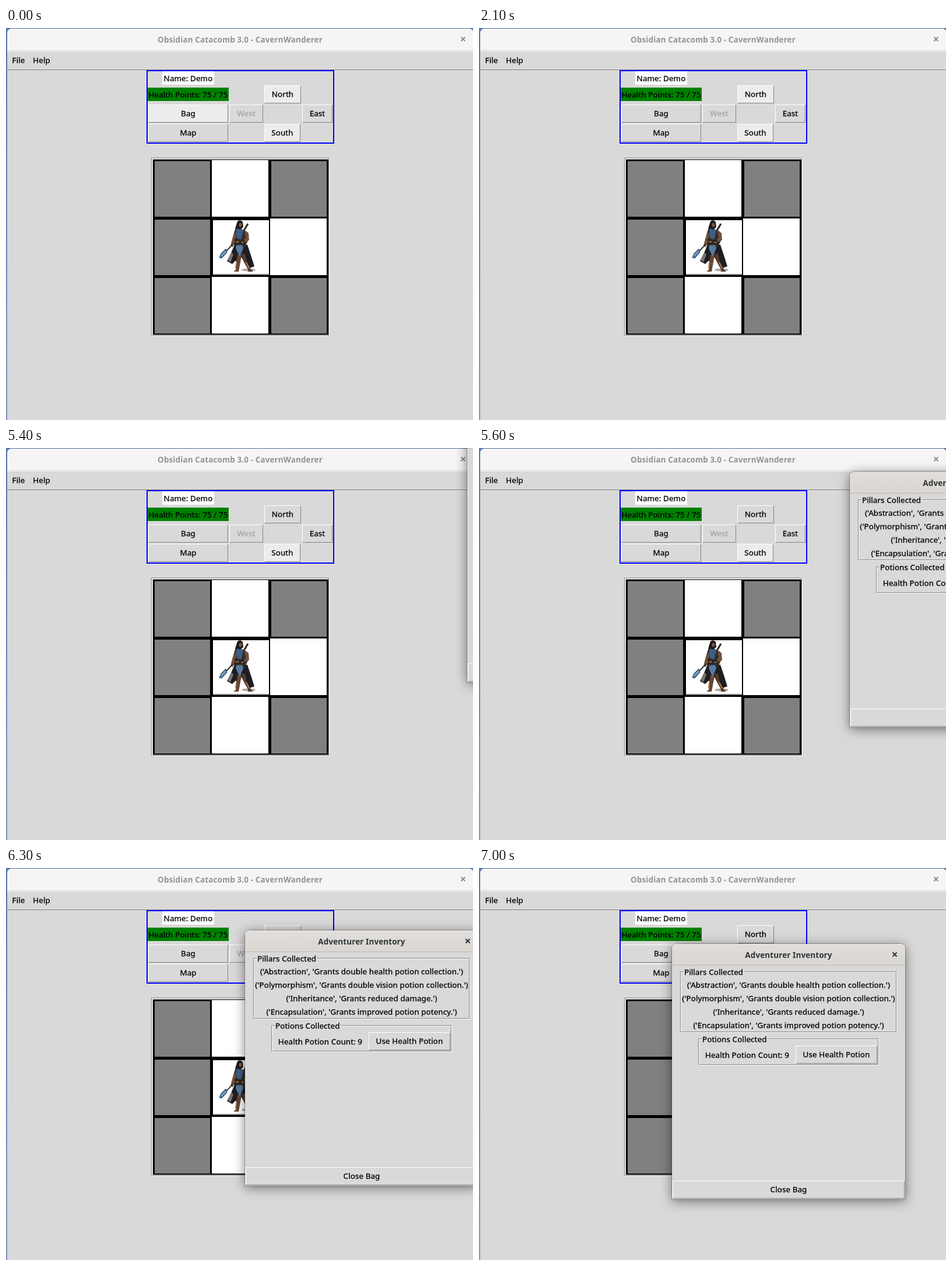
Animation, 801 px wide and 671 px high, one loop 8 s. Source, as an HTML page:

```html
<!DOCTYPE html>
<html lang="en">
<head>
<meta charset="utf-8">
<title>Dungeon game window</title>
<style>
html, body { margin: 0; width: 100%; height: 100%; overflow: hidden; }
body { position: relative; background: linear-gradient(#5a7dbb, #6f8fc8 50%, #8ba6d2);
  font: 500 13.4px "Noto Sans", "Open Sans", sans-serif; color: #000;
  letter-spacing: .1px; -webkit-text-stroke: .3px; }
div, svg { position: absolute; box-sizing: border-box; }
div { white-space: nowrap; }
.text { text-align: center; }
.title { font-weight: 700; font-size: 13.5px; -webkit-text-stroke: 0; }
.raised { border: 1px solid; border-color: #fff #828282 #828282 #fff; background: #d9d9d9; }
.groove { border: 1px solid; border-color: #828282 #fff #fff #828282; }
.groove::after { content: ""; position: absolute; inset: 0; border: 1px solid;
  border-color: #fff #828282 #828282 #fff; }
.hover { background: #ececec; }
.pressed { border-color: #828282 #fff #fff #828282; padding: 1px 0 0 1px; }
#main { left: 2px; top: 1px; width: 800px; height: 671px; background: #d9d9d9;
  border-radius: 8px 8px 0 0; box-shadow: 0 0 0 1px rgba(0,0,0,.15); overflow: hidden; }
#stage { left: 0; top: 0; width: 801px; height: 671px; overflow: hidden; }
#bag { left: 0; top: 0; width: 400px; height: 437px; background: #d9d9d9;
  border-radius: 8px 8px 0 0;
  box-shadow: 0 0 0 1px rgba(0,0,0,.25), 0 3px 20px rgba(0,0,0,.5); }
</style>
</head>
<body>
<div id="stage"><div id="main"></div></div>
<script>
const stage = document.getElementById("stage");

function box(parent, x, y, w, h, cls = "", css = "", text = "") {
  const el = document.createElement("div");
  el.className = cls;
  el.style.cssText = `left:${x}px;top:${y}px;width:${w}px;height:${h}px;${css}`;
  el.textContent = text;
  parent.append(el);
  return el;
}
// Text centred on a point
const label = (parent, cx, cy, text, css = "", cls = "") =>
  box(parent, cx - 200, cy - 10, 400, 20, "text " + cls, "line-height:20px;" + css, text);
const button = (parent, x, y, w, h, text, css = "") =>
  box(parent, x, y, w, h, "text raised", `line-height:${h - 2}px;` + css, text);
const fill = (x, y, w, h, color) => box(stage, x, y, w, h, "", "background:" + color);

function svg(parent, x, y, w, h, body) {
  parent.insertAdjacentHTML("beforeend",
    `<svg style="left:${x}px;top:${y}px" width="${w}" height="${h}">${body}</svg>`);
}
const cross = (parent, cx, cy, color) => svg(parent, cx - 5, cy - 5, 10, 10,
  `<path d="M1.5 1.5l7 7m0-7l-7 7" stroke="${color}" stroke-width="2"/>`);

function group(parent, x, y, w, h, text) {
  box(parent, x, y, w, h, "groove");
  box(parent, x + 6, y - 9, 0, 20, "", "width:auto;padding:0 1px;line-height:20px;background:#d9d9d9", text);
}

// Main window
box(document.getElementById("main"), 0, 0, 800, 38, "", "background:#f6f5f4;border-bottom:1px solid #d5d0cc");
label(stage, 401.5, 19.5, "Obsidian Catacomb 3.0 - CavernWanderer", "color:#929595", "title");
cross(stage, 784, 19, "#8b8e8f");
box(stage, 2, 39, 800, 33, "", "border:solid #fff;border-width:1px 0 0;border-bottom:1px solid #828282");
const help = box(stage, 39, 39, 43, 32);
label(stage, 21.5, 55, "File");
label(stage, 61, 55, "Help");

// Controls
box(stage, 241, 72, 322, 126, "", "border:2px solid #00f");
fill(268, 74, 89, 23, "#fff");
label(stage, 312.5, 86, "Name: Demo");
fill(243, 102, 139, 23, "#008000");
label(stage, 312.5, 114, "Health Points: 75 / 75");
const bagButton = button(stage, 244, 131, 137, 31, "Bag");
button(stage, 244, 164, 137, 31, "Map");
button(stage, 383, 131, 58, 31, "West", "color:#a3a3a3");
const north = button(stage, 443, 98, 63, 31, "North");
button(stage, 508, 131, 52, 31, "East");
button(stage, 443, 164, 62, 31, "South").classList.add("hover");

// Map view
box(stage, 249, 222, 306, 306, "groove");
fill(252, 225, 301, 300, "#000");
for (const [col, row] of [[0, 0], [2, 0], [0, 1], [0, 2], [2, 2]])
  fill(255 + col * 100, 228 + row * 100, 95, 95, "#808080");
for (const [col, row] of [[1, 0], [2, 1], [1, 2]])
  fill(253 + col * 100, 226 + row * 100, 97, 97, "#fff");
fill(355, 329, 96, 94, "#fff");
fill(355, 421, 96, 2, "#808080");

// Hero silhouette
svg(stage, 352, 325, 100, 100, `
  <ellipse cx="64" cy="89" rx="12" ry="2.5" fill="#aaa"/>
  <path d="M63 10l-9 15" stroke="#33251d" stroke-width="3"/>
  <path d="M40 46l-6 14-7 14 9 5 6-6 4 8 6-14 6 12 5 8 11-4-6-19-6-18z" fill="#1e1d22"/>
  <path d="M35 59l-7 13 5 4 5-13z" fill="#77736f"/>
  <path d="M45 63l-2 14-1 12-4 3h9l3-16 2-12z" fill="#68462f"/>
  <path d="M52 62l5 15 6 11v4h9l-4-4-7-12-3-15z" fill="#5a3c29"/>
  <path d="M43 77l-1 9m18-10l5 10" stroke="#a57c58" stroke-width="2"/>
  <path d="M41 21l-3 18 5 12h14l6-12-1-15-8-4z" fill="#332c2c"/>
  <path d="M40 22l-4 14-3 12 4 2 6-15zM57 22l7 4 1 12-10 5-2-3 6-6z" fill="#70503c"/>
  <path d="M44 18l-2 11 5 9h4l4-16-4-5z" fill="#3c5f86"/>
  <path d="M44 44l-2 8 7 15 6-15-3-8z" fill="#567ba2"/>
  <path d="M40 37l17 3m-18 5l20-1" stroke="#30261f" stroke-width="4"/>
  <path d="M43 41h4m5 1h3" stroke="#a17d5d" stroke-width="2"/>
  <path d="M45 6q5-4 9 1l1 9-6 4-4-2-5 7 2-10z" fill="#1d1918"/>
  <ellipse cx="50" cy="12" rx="2.5" ry="3.5" fill="#7d5a44"/>
  <path d="M37 45L23 60" stroke="#333" stroke-width="2"/>
  <path d="M25 53l-8 8-3 7 4 1 9-10z" fill="#50779e" stroke="#293f57"/>
  <path d="M17 65l8-8" stroke="#9ab8d4" stroke-width="1.5"/>`);

// Inventory window
const bag = box(stage, 0, 0, 400, 437);
bag.id = "bag";
box(bag, 0, 0, 400, 37, "", "border-radius:8px 8px 0 0;background:linear-gradient(#e1dedb,#dad6d2);border-bottom:1px solid #bfb8b1;box-shadow:inset 0 1px #f0eeec");
label(bag, 200, 18.5, "Adventurer Inventory", "color:#2e3436", "title");
cross(bag, 382, 18, "#2e3436");
group(bag, 14, 47, 372, 105, "Pillars Collected");
[
  "('Abstraction', 'Grants double health potion collection.')",
  "('Polymorphism', 'Grants double vision potion collection.')",
  "('Inheritance', 'Grants reduced damage.')",
  "('Encapsulation', 'Grants improved potion potency.')"
].forEach((text, i) => label(bag, 200, 70 + i * 23, text));
group(bag, 45, 162, 310, 46, "Potions Collected");
label(bag, 129, 190, "Health Potion Count: 9");
button(bag, 212, 174, 140, 31, "Use Health Potion");
button(bag, 1, 405, 398, 31, "Close Bag");

// Drag path: time, x, y
const path = [
  [0, 801, -36], [5300, 801, -36], [5400, 791, -36], [5700, 558, 79], [5900, 558, 79],
  [6000, 499, 104], [6200, 432, 106], [6400, 388, 108], [6600, 359, 111],
  [6800, 338, 119], [7000, 331, 130], [8000, 331, 130]
];

function place(t) {
  const i = path.findIndex(p => p[0] > t);
  const [a, b] = [path[i - 1], path[i]];
  const k = (t - a[0]) / (b[0] - a[0]);
  return [1, 2].map(n => Math.round(a[n] + (b[n] - a[n]) * k));
}

function draw() {
  const t = performance.now() % 8000;
  const step = Math.floor(t / 100) * 100;
  const pressed = t >= 2900 && t < 3100;
  help.className = t >= 1500 && t < 2100 ? "raised hover" : "";
  bagButton.classList.toggle("hover", t < 700 || t >= 2500 && t < 3100);
  bagButton.classList.toggle("pressed", pressed);
  north.classList.toggle("hover", t < 3200);
  const [x, y] = place(step);
  bag.style.transform = `translate(${x}px,${y}px)`;
  bag.style.opacity = Math.max(0, Math.min(1, (step - 3000) / 400));
  requestAnimationFrame(draw);
}
draw();
</script>
</body>
</html>
```
